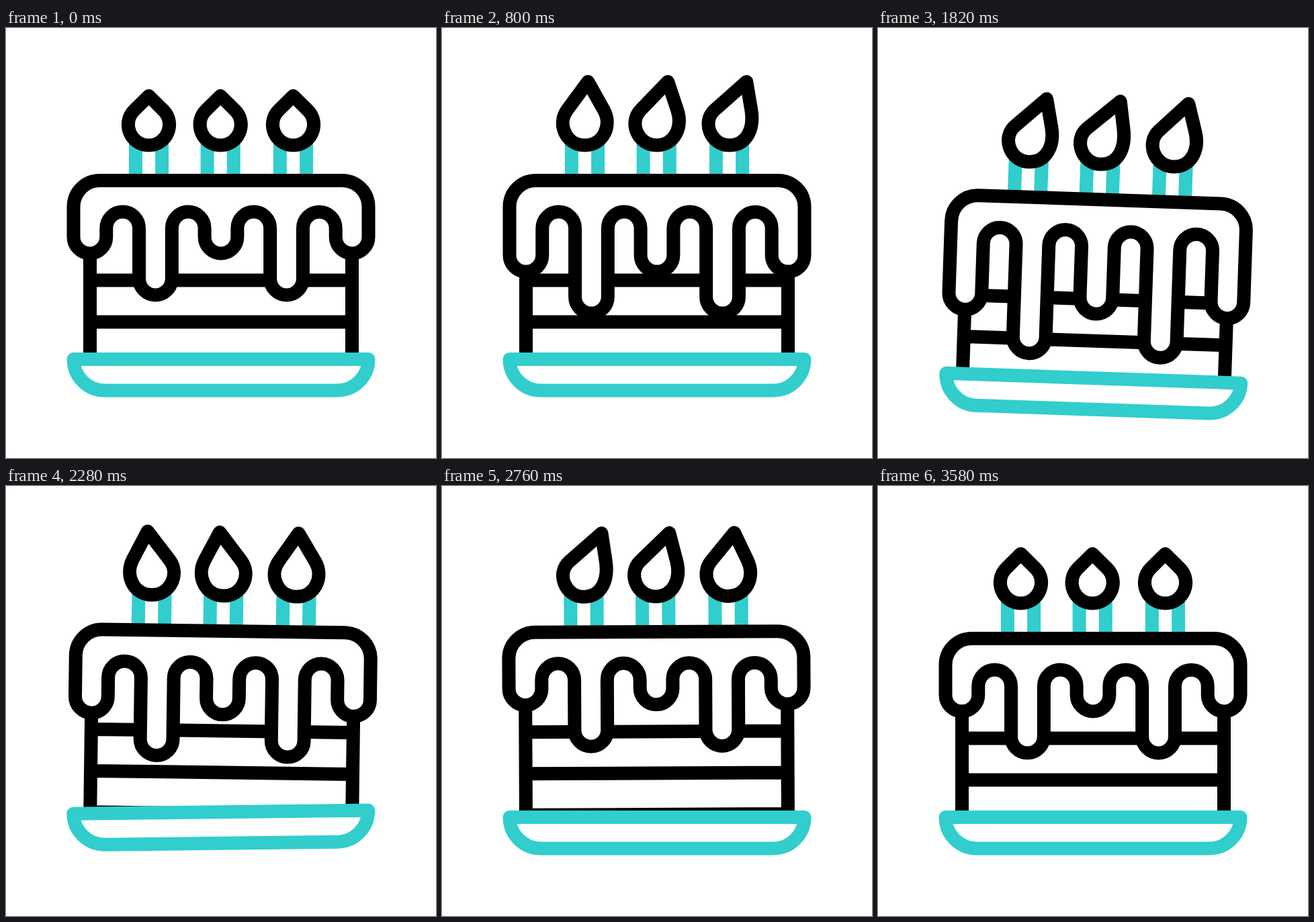
These frames come from a looping animation (640 px wide and 640 px high, 3.6 s). An HTML page:

```html
<!DOCTYPE html>
<html lang="en">
<head>
<meta charset="utf-8">
<title>Birthday cake</title>
<style>
  html, body { margin: 0; height: 100%; overflow: hidden; background: #fff; }
  svg { display: block; width: 100vw; height: 100vh; }
  path { fill: #fff; stroke: #000; stroke-width: 20; stroke-linejoin: round; }
  .teal { stroke: #32cdcd; }
</style>
</head>
<body>
<svg viewBox="0 0 640 640">
  <g id="body">
    <path d="M125 311V499H515V311M125 375.5H515M125 437.5H515" style="stroke-linejoin:miter"/>
    <g id="candles"></g>
    <path id="icing"/>
  </g>
  <path id="plate" class="teal" d="M100.5 493H539.5A46.5 46.5 0 0 1 493 539.5H147A46.5 46.5 0 0 1 100.5 493Z"/>
</svg>
<script>
const LOOP = 3600, SWING = 425;
const byId = id => document.getElementById(id);
const body = byId('body'), icing = byId('icing'), plate = byId('plate');

// Each candle's flame starts swaying a little after its right neighbour.
const flames = [[212.5, 200], [319.2, 100], [427.5, 0]].map(([x, delay]) => {
  const add = (d, cls) => {
    const p = document.createElementNS('http://www.w3.org/2000/svg', 'path');
    p.setAttribute('d', d);
    p.setAttribute('class', cls);
    return byId('candles').appendChild(p);
  };
  add(`M${x - 19.6} 165V222M${x + 19.6} 165V222`, 'teal');
  const el = add('', '');
  el.setAttribute('transform', `translate(${x} 144)`);
  return { el, delay };
});

const smooth = u => u * u * (3 - 2 * u);
const fall = u => u * u;
const linear = u => u;

// Keys are [time, value, easing into this key].
function track(t, keys) {
  for (let i = 1; i < keys.length; i++) {
    const [t0, v0] = keys[i - 1], [t1, v1, ease] = keys[i];
    if (t < t1) return t <= t0 ? v0 : v0 + (v1 - v0) * ease((t - t0) / (t1 - t0));
  }
  return keys[keys.length - 1][1];
}

const SWAY = [0, -8.5, 27, -8.5, 27, -8.5, 27, -8.5, 0].map((v, i) => [i * SWING, v, smooth]);
const STRETCH = [[0, 0], [SWING, 1, smooth], [7 * SWING, 1, linear], [8 * SWING, 0, smooth]];
const DRIP = [[0, 0], [2000, 68, linear], [2410, 0, smooth]];
const hop = (low, high, top, land) =>
  [[1600, 0], [2000, low, linear], [top, high, smooth], [land, 0, fall]];
const BODY_Y = hop(51, -66, 2540, 2780), BODY_TURN = hop(3.52, -1.7, 2540, 2780);
const PLATE_Y = hop(51, -51, 2510, 2700), PLATE_TURN = hop(3.52, -3.7, 2510, 2700);

function flamePath(sway, stretch) {
  const tip = [sway, -43 - 21 * stretch];
  const side = s => {
    const x = s * (21.6 + 5.5 * stretch) + 0.22 * sway, y = -21.6 - 0.7 * stretch;
    const dx = x - tip[0], dy = y - tip[1], k = 27.2 / Math.hypot(dx, dy);
    return { joint: `${x} ${y}`, handle: `${x + dx * k} ${y + dy * k}` };
  };
  const l = side(-1), r = side(1);
  return `M${tip}L${l.joint}C${l.handle} -27.2 30.5 0 30.5C27.2 30.5 ${r.handle} ${r.joint}Z`;
}

function icingPath(drop) {
  const step = 439 / 9, r = step / 2;
  let d = 'M100.5 266';
  [311, 373, 311, 373, 311].forEach((y, i) => {
    if (i) d += `V298a${r} ${r} 0 0 1 ${step} 0`;
    d += `V${y + drop}a${r} ${r} 0 0 0 ${step} 0`;
  });
  return d + 'V266a39 39 0 0 0 -39 -39H139.5a39 39 0 0 0 -39 39Z';
}

const place = (el, y, turn) =>
  el.setAttribute('transform', `translate(0 ${y}) rotate(${turn} 320 516)`);

function draw(now) {
  const t = now % LOOP;
  for (const { el, delay } of flames)
    el.setAttribute('d', flamePath(track(t - delay, SWAY), track(t - delay, STRETCH)));
  icing.setAttribute('d', icingPath(track(t, DRIP)));
  place(body, track(t, BODY_Y), track(t, BODY_TURN));
  place(plate, track(t, PLATE_Y), track(t, PLATE_TURN));
}

const start = performance.now();
function loop() {
  draw(performance.now() - start);
  requestAnimationFrame(loop);
}
loop();
</script>
</body>
</html>
```
